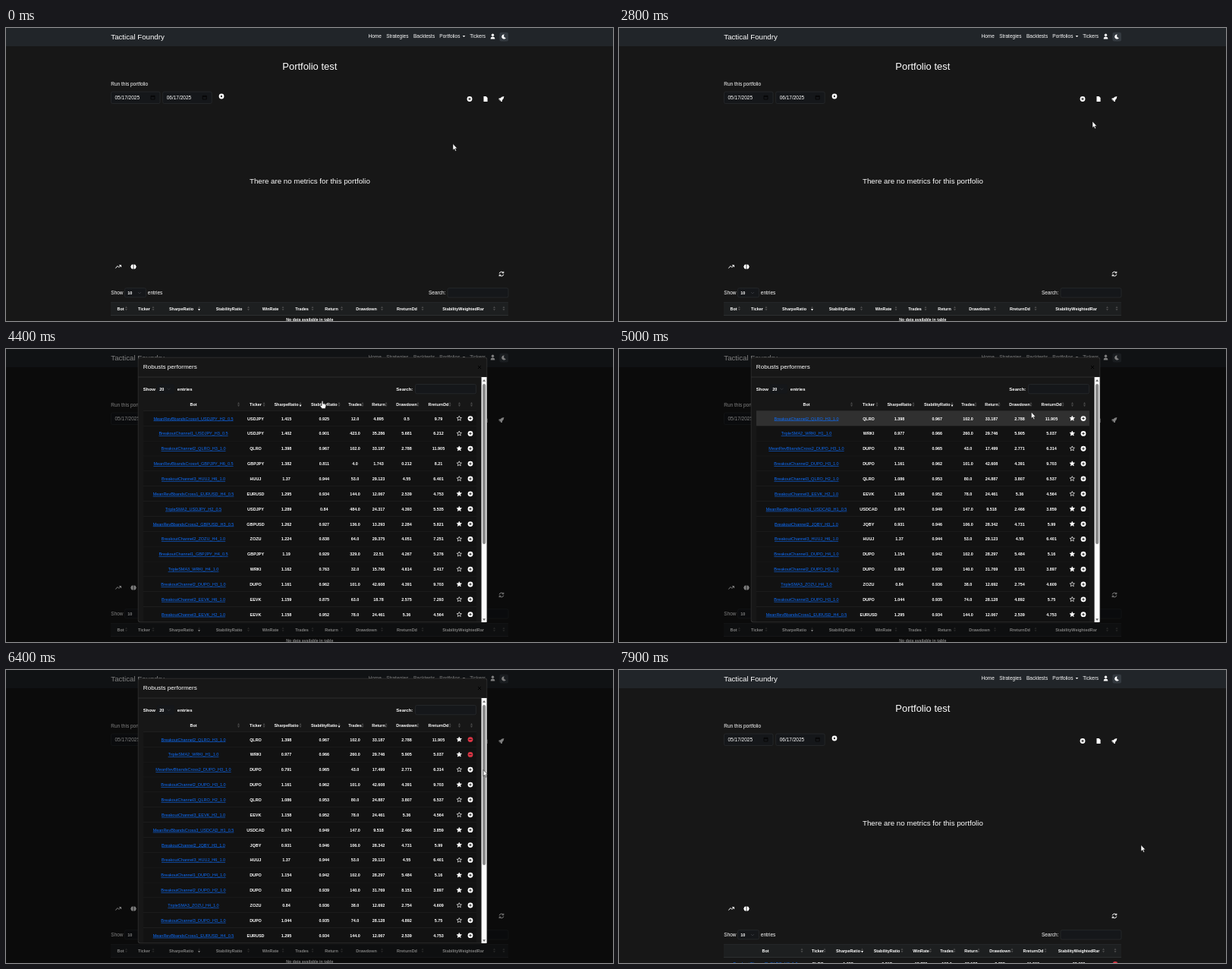
An HTML page for the animation above (8 s loop, 800 px wide and 386 px high).

```html
<!DOCTYPE html>
<html lang="en">
<head>
<title>Portfolio test</title>
<style>
  html, body { margin: 0; width: 100%; height: 100%; overflow: hidden; background: #171717; }
  svg { display: block; width: 800px; height: 386px; }
  text { font: 6.5px "Liberation Sans", Arial, sans-serif; fill: #fff; white-space: pre; }
  .cell { font-size: 5.45px; font-weight: bold; text-anchor: middle; }
  .link { font-size: 5.5px; text-anchor: middle; fill: #0d6efd; text-decoration: underline; }
  .label { font-size: 6px; font-weight: bold; }
  .mid { text-anchor: middle; }
  .field { fill: #15171a; stroke: #2a2d30; stroke-width: .7; }
  .line { fill: none; stroke: #fff; stroke-width: 1; }
</style>
</head>
<body>
<svg id="stage" viewBox="0 0 800 386"></svg>
<script>
const LOOP = 8000, STEP = 100;
const stage = document.getElementById('stage');

// bot, ticker, period_risk, sharpe, stability, trades, return, drawdown, return/dd, starred
const bots = `
M4 USDJPY H2_0.5 1.415 0.925 12.0 4.895 0.5 9.79 -
B1 USDJPY H3_0.5 1.402 0.901 423.0 35.286 5.681 6.212 -
B2 QLRO H3_1.0 1.398 0.967 102.0 33.187 2.788 11.905 *
M4 GBPJPY H6_0.5 1.382 0.811 4.0 1.743 0.212 8.21 -
B3 HUUJ H6_1.0 1.37 0.944 53.0 29.123 4.55 6.401 -
M1 EURUSD H4_0.5 1.295 0.934 144.0 12.067 2.539 4.753 *
T2 USDJPY H2_0.5 1.289 0.84 484.0 24.317 4.393 5.535 *
M2 GBPUSD H3_0.5 1.262 0.927 136.0 13.293 2.284 5.821 *
B2 ZOZU H4_1.0 1.224 0.838 64.0 29.375 4.051 7.251 -
B1 GBPJPY H4_0.5 1.19 0.929 329.0 22.51 4.267 5.276 -
T3 WRKI H4_1.0 1.162 0.763 32.0 15.766 4.614 3.417 -
B2 DUPO H3_1.0 1.161 0.962 101.0 42.608 4.391 9.703 *
B2 EEVK H6_1.0 1.159 0.875 63.0 18.78 2.575 7.293 -
B3 EEVK H2_1.0 1.158 0.952 78.0 24.461 5.36 4.564 -
T2 WRKI H1_1.0 0.977 0.966 260.0 29.746 5.905 5.037 *
M2 DUPO H3_1.0 0.791 0.965 43.0 17.499 2.771 6.314 -
B3 QLRO H2_1.0 1.086 0.953 80.0 24.887 3.807 6.537 -
M3 USDCAD H1_0.5 0.974 0.949 147.0 9.518 2.466 3.859 *
B2 JQBY H3_1.0 0.931 0.946 106.0 28.342 4.731 5.99 *
B1 DUPO H4_1.0 1.154 0.942 102.0 28.297 5.484 5.16 *
B2 DUPO H2_1.0 0.929 0.939 140.0 31.769 8.151 3.897 *
T3 ZOZU H4_1.0 0.84 0.936 38.0 12.692 2.754 4.609 -
B3 DUPO H3_1.0 1.044 0.935 74.0 28.128 4.892 5.75 -`.trim().split('\n').map(s => s.split(' '));
const families = { M: 'MeanRevBbandsCross', B: 'BreakoutChannel', T: 'TripleSMA' };
const botName = ([code, ticker, run]) => `${families[code[0]]}${code[1]}_${ticker}_${run}`;
const topBots = col => [...bots].sort((a, b) => b[col] - a[col]).slice(0, 14);
const bySharpe = topBots(3), byStability = topBots(4);

// Pointer stops: time, x, y
const stops = [
  [0, 589, 152.5], [700, 609, 94], [2100, 609, 94], [2600, 624, 123], [3400, 624, 123],
  [4200, 417, 68.5], [4700, 417, 68.5], [5200, 612, 91], [5400, 612, 91], [5600, 613.5, 113],
  [6300, 613.5, 113], [6700, 713, 231.5], [6900, 713, 231.5], [7200, 688, 230.5], [LOOP, 688, 230.5]
];

const clamp = v => Math.max(0, Math.min(1, v));
const ramp = (t, start, length) => clamp((t - start) / length);
const easeOut = v => 1 - (1 - v) ** 1.65;

function pointerAt(t) {
  const i = stops.findIndex(s => s[0] > t);
  const [t0, x0, y0] = stops[i - 1], [t1, x1, y1] = stops[i];
  const u = (t - t0) / (t1 - t0), k = u * u * (3 - 2 * u);
  return [x0 + (x1 - x0) * k, y0 + (y1 - y0) * k];
}

const text = (s, x, y, cls = '', size) =>
  `<text x="${x}" y="${y}" class="${cls}"${size ? ` style="font-size:${size}px"` : ''}>${s}</text>`;
const rect = (x, y, w, h, attrs) => `<rect x="${x}" y="${y}" width="${w}" height="${h}" ${attrs}/>`;
const path = (d, x, y, attrs = 'fill="#fff"') => `<path d="${d}" transform="translate(${x} ${y})" ${attrs}/>`;
const chevron = (x, y) => path('M-2-1L0 1 2-1', x, y, 'fill="none" stroke="#3a3d40" stroke-width=".8"');

const sorter = (x, y, active) =>
  path('M-1.5-.6L0-3 1.5-.6Z', x, y, 'fill="#4a4a4a"') +
  path('M-1.5.6L0 3 1.5.6Z', x, y, `fill="${active ? '#fff' : '#4a4a4a'}"`);

const badge = (x, y, mark, color = '#fff') =>
  `<circle cx="${x}" cy="${y}" r="3.4" fill="${color}"/>` + path(mark, x, y, 'fill="#171717" stroke="#171717" stroke-width=".9"');
const PLUS = 'M-1.7 0H1.7M0-1.7V1.7', MINUS = 'M-1.7 0H1.7', PLAY = 'M-.6-1L1 0-.6 1Z';

const starPoints = Array.from({ length: 10 }, (_, i) => {
  const r = i % 2 ? 1.5 : 3.3, a = i * Math.PI / 5;
  return `${(r * Math.sin(a)).toFixed(2)} ${(-r * Math.cos(a)).toFixed(2)}`;
}).join('L');
const star = (x, y, full) =>
  path(`M${starPoints}Z`, x, y, `fill="${full ? '#fff' : 'none'}" stroke="#fff" stroke-width=".7"`);

function headings(names, xs, sortXs, y, active) {
  return names.map((n, i) => text(n, xs[i], y + 2, 'cell')).join('') +
    sortXs.map((x, i) => sorter(x, y, i === active)).join('');
}

const pageCols = ['Bot', 'Ticker', 'SharpeRatio', 'StabilityRatio', 'WinRate', 'Trades', 'Return', 'Drawdown', 'RreturnDd', 'StabilityWeightedRar'];
const modalCols = pageCols.filter((_, i) => i !== 4 && i !== 9);

const dateField = (x, value) =>
  rect(x, 84, 64.5, 15.5, 'rx="2" class="field"') + text(value, x + 5, 94) +
  path('M-2.5-2.2H2.5V2.5H-2.5ZM-2.5-1H2.5', x + 55, 91.5, 'fill="none" stroke="#050505" stroke-width=".9"');

const page = rect(0, 0, 800, 386, 'fill="#171717"') + rect(0, 0, 800, 24, 'fill="#212529"') +
  text('Tactical Foundry', 138.3, 15.3, '', 9.7) +
  [['Home', 477.5], ['Strategies', 501.2], ['Backtests', 537], ['Portfolios', 571.3], ['Tickers', 611.3]]
    .map(([s, x]) => text(s, x, 13.3)).join('') +
  path('M-1.8-.9H1.8L0 .9Z', 603.5, 11) +
  path('M-2.8 3.4Q-2.8.4 0 .4T2.8 3.4Z', 641.5, 11) + '<circle cx="641.5" cy="9.2" r="1.7" fill="#fff"/>' +
  rect(650.5, 5.7, 11.5, 11.8, 'rx="2" fill="#343a40"') +
  path('M.6-2.9A3 3 0 1 0 2.7 1.5 2.6 2.6 0 0 1 .6-2.9Z', 656.2, 11.4) +
  text('Portfolio test', 400.3, 55.4, 'mid', 12.95) +
  text('Run this portfolio', 138.3, 75.7) +
  dateField(138.5, '05/17/2025') + dateField(206.7, '06/17/2025') +
  badge(284, 90, PLAY) + badge(611, 93.5, PLUS) +
  path('M-2.5-3.4H.6L2.6-1.4V3.4H-2.5Z', 632, 93.5) +
  path('M3.4-3.4Q0-3.2-1.6-1H-3.3L-3.6.8-1.8 1 -2.8 2.8-1 1.8-.8 3.6 1 3.2V1.6Q3.2 0 3.4-3.4Z', 653, 93.5) +
  text('There are no metrics for this portfolio', 400.4, 205.2, 'mid', 9.73) +
  path('M-3.6 2L-1-1 .8 .8 3.3-1.8M1.2-2H3.6V.5', 148, 314.5, 'class="line"') +
  path('M-.4-3Q-3-3.5-3.2-1.2-4.4 0-3.2 1.3-3 3.5-.4 3ZM.4-3Q3-3.5 3.2-1.2 4.4 0 3.2 1.3 3 3.5.4 3Z', 168, 314.5) +
  path('M-2.8-.6A2.9 2.9 0 0 1 2.4-1.6M2.8-3.2V-1.2H.7M2.8.6A2.9 2.9 0 0 1-2.4 1.6M-2.8 3.2V1.2H-.7', 653, 324, 'class="line"') +
  text('Show', 138.3, 351.2) + rect(156.5, 342.7, 28, 12, 'rx="2" class="field"') +
  text('10', 160.3, 351, 'label', 5.5) + chevron(176, 349) + text('entries', 186.8, 351.2) +
  text('Search:', 557, 351.2) + rect(582, 342.7, 80, 12.3, 'rx="2" class="field"') +
  rect(138, 361.3, 524, 17, 'fill="#1d1f20"') + rect(138, 361, 524, .6, 'fill="#2b2d2f"') +
  rect(138, 378, 524, .7, 'fill="#36383a"');

const emptyTable = headings(pageCols, [151, 182, 231, 294, 348.5, 390, 429, 475, 528.5, 602.5],
  [158.5, 194, 254.5, 319.5, 365, 404, 442.5, 495.5, 549, 643.5, 656], 369.5, 2) +
  text('No data available in table', 400.3, 385.6, 'cell', 5.2);

const filledXs = [193, 262, 302, 353, 398, 432, 464, 502, 546, 606];
const [, pick, , ...stats] = byStability[0];
const filledTable = headings(pageCols, filledXs,
  [241, 271, 320.5, 373, 410.5, 442, 474, 518, 562, 638.5, 654], 369.5, 2) +
  text(botName(byStability[0]), 193, 389, 'link') +
  [pick, stats[0], stats[1], '68.728', ...stats.slice(2, 6), '32.092']
    .map((s, i) => text(s, filledXs[i + 1], 389, 'cell')).join('') +
  badge(654, 387.3, MINUS, '#dc3545');

const modalXs = [247, 329, 369.5, 419.3, 460, 491, 528, 570];
const ROW = 19.86, TOP = 81.6;

const modalFrame = rect(174, 11, 460, 349, 'rx="3" fill="#171717" stroke="#3c3c3c" stroke-width=".8"') +
  rect(174, 36.7, 460, .6, 'fill="#3c3c3c"') +
  text('Robusts performers', 180.8, 26.3, '', 8.1) +
  path('M-2-2L2 2M2-2L-2 2', 624, 24, 'stroke="#000" stroke-width="1"') +
  text('Show', 180.8, 54.8, 'label') + rect(199, 46.5, 23, 12, 'rx="2" fill="#15171a"') +
  text('20', 202.3, 54.7, 'label', 5.5) + chevron(214.5, 52.7) + text('entries', 225.8, 54.8, 'label') +
  text('Search:', 514.3, 54.8, 'label') + rect(539.5, 46.5, 80, 12.3, 'rx="2" class="field"') +
  rect(181, TOP - .3, 439, .6, 'fill="#333"');

const scrollbar = rect(626.6, 37, 7, 323, 'fill="#fcfcfc"') + rect(628, 46, 4.2, 211, 'rx="2" fill="#8b8b8b"') +
  path('M-2 1.3H2L0-1.5Z', 630.1, 41.5, 'fill="#666"') + path('M-2-1.3H2L0 1.5Z', 630.1, 356.5, 'fill="#666"');

function modalRow(bot, i, hovered, onButton, added) {
  const top = TOP + i * ROW, y = top + ROW / 2;
  const [, ticker, , ...values] = bot;
  const mark = values.pop();
  return rect(181, top, 439, ROW, `fill="${hovered ? '#303030' : '#121212'}"`) +
    rect(181, top + ROW - .3, 439, .6, 'fill="#2e2e2e"') +
    text(botName(bot), 247, y + 2, 'link') +
    [ticker, ...values].map((s, k) => text(s, modalXs[k + 1], y + 2, 'cell')).join('') +
    star(597.3, y, mark === '*') +
    (onButton ? rect(607, y - 5, 10, 10, 'rx="1.5" fill="#0d4fae"') : '') +
    badge(612, y, added ? MINUS : PLUS, added ? '#dc3545' : '#fff');
}

function modal(t, px, py) {
  const sorted = t >= 4600;
  const over = px > 181 && px < 620 ? Math.floor((py - TOP) / ROW) : -1;
  const rows = (sorted ? byStability : bySharpe).map((bot, i) => modalRow(bot, i, i === over,
    i === over && px > 606, (i === 0 && t >= 5300) || (i === 1 && t >= 5900)));
  return modalFrame +
    headings(modalCols, modalXs, [306.5, 340, 388, 439, 470, 501, 543, 585, 597.5, 613.5], 73, sorted ? 3 : 2) +
    rows.join('') + scrollbar;
}

const ARROW = 'M0 0V8.4L1.9 6.7 3.2 9.7 4.6 9.1 3.3 6.2H5.8Z';
const HAND = 'M-.9.4Q0-.8.9.4V3.6L4 4.5Q4.9 5 4.6 6.6L3.8 10H-.5L-3.2 6.5Q-2.8 5-.9 6.2Z';

function pointer(x, y, modalOpen) {
  const onTable = x > 181 && x < 620 && y > 64 && (y < TOP || x > 606);
  const hand = modalOpen ? onTable : Math.hypot(x - 611, y - 93.5) < 5;
  return path(hand ? HAND : ARROW, x, y, 'fill="#fff" stroke="#000" stroke-width=".5"');
}

function draw(t) {
  const [x, y] = pointerAt(t);
  const dim = .5 * (ramp(t, 2900, 150) - ramp(t, 7000, 150));
  const opacity = ramp(t, 3060, 150) - ramp(t, 6831, 150);
  const slide = -24 * (1 - easeOut(ramp(t, 3060, 300)) + easeOut(ramp(t, 6831, 300)));
  const open = opacity > 0;
  stage.innerHTML = '<clipPath id="box"><rect x="173.5" y="10.5" width="461" height="350" rx="3"/></clipPath>' +
    page + (t >= 7500 ? filledTable : emptyTable) +
    (dim > 0 ? rect(0, 0, 800, 386, `opacity="${dim}"`) : '') +
    (open ? `<g transform="translate(0 ${slide})" opacity="${opacity}" clip-path="url(#box)">${modal(t, x, y)}</g>` : '') +
    pointer(x, y, open);
}

let shown = -1;
const start = performance.now();
function tick() {
  const t = Math.floor(((performance.now() - start) % LOOP) / STEP) * STEP;
  if (t !== shown) draw(shown = t);
  requestAnimationFrame(tick);
}
tick();
</script>
</body>
</html>
```
